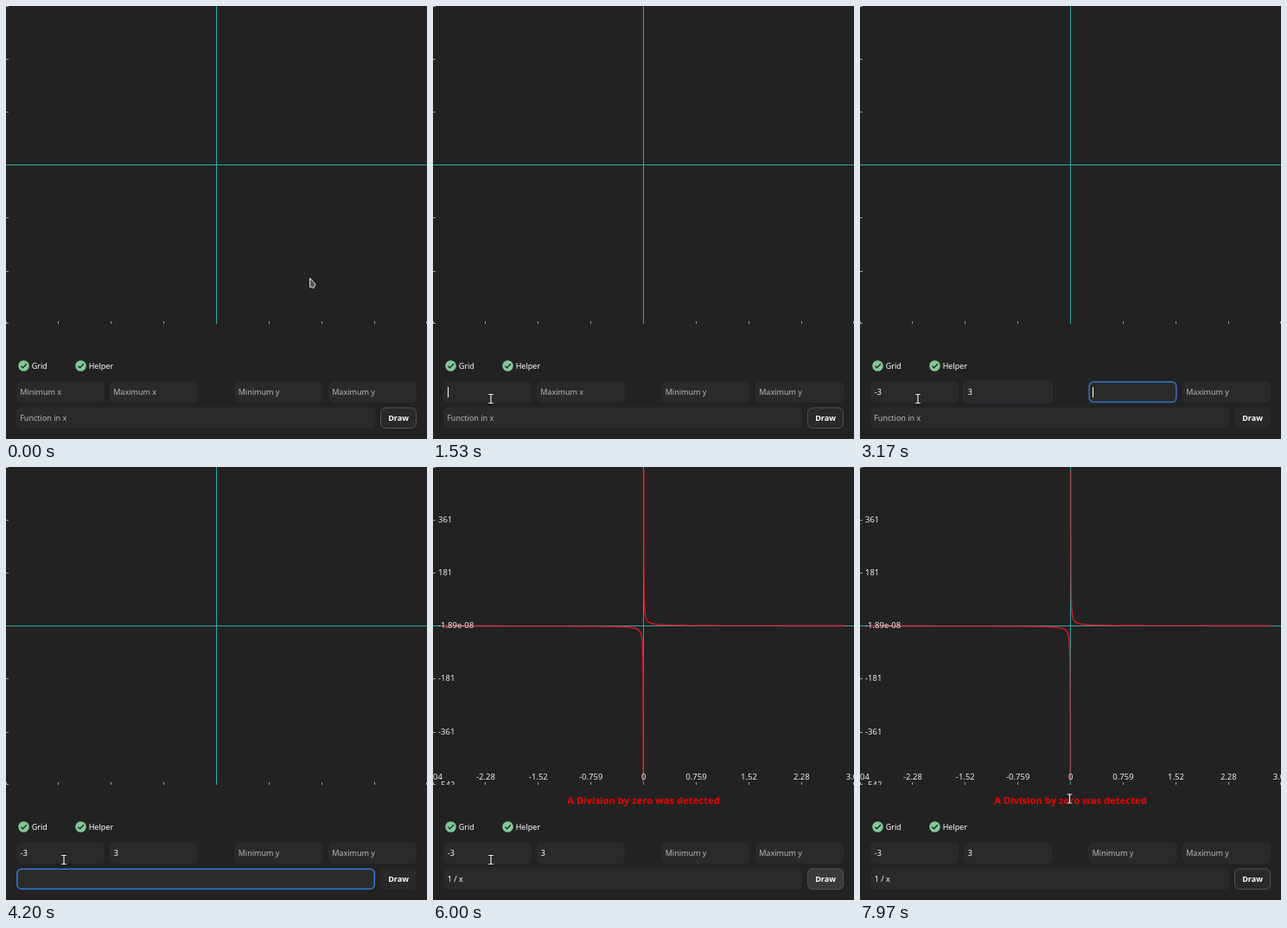
These frames come from a looping animation (487 px wide and 500 px high, 8 s). An HTML page with a canvas:

```html
<!DOCTYPE html>
<html lang="en">
<head>
<meta charset="utf-8">
<title>Function plotter</title>
<style>
  html, body { margin: 0; width: 100%; height: 100%; overflow: hidden; background: #222; }
  canvas { display: block; width: 487px; height: 500px; }
</style>
</head>
<body>
<canvas id="stage" width="487" height="500"></canvas>
<script>
const ctx = document.getElementById('stage').getContext('2d');
const LOOP = 8000, W = 487, H = 500;
const PLOT = { bottom: 367, cx: 243.5, cy: 183.5, stepX: 60.9, stepY: 61.2 };
const FONT = '"Noto Sans", "Open Sans", sans-serif';
const PLOTTED = 5960, PRESS = 5710, RELEASE = 5960;

const fields = [
  { x: 12, y: 433.5, w: 102, hint: 'Minimum x', keys: [[2280, '-'], [2480, '-3']] },
  { x: 120, y: 433.5, w: 102, hint: 'Maximum x', keys: [[2850, '3']] },
  { x: 264.5, y: 433.5, w: 102, hint: 'Minimum y', keys: [] },
  { x: 373, y: 433.5, w: 102, hint: 'Maximum y', keys: [] },
  { x: 12, y: 463.5, w: 415, hint: 'Function in x', keys: [[4430, '1 / x']] }
];
const FIELD_H = 24.5, DRAW = 5;
const focusSteps = [[-1000, DRAW], [1530, 0], [2700, 1], [3000, 2], [3300, 3], [3600, 4], [5500, DRAW]];

// Pointer path: time, x, y
const path = [
  [570, 351.5, 314], [870, 98.5, 412], [1060, 66, 466], [1390, 67, 453.5],
  [6170, 67, 453.5], [6430, 120, 330], [6660, 238, 114], [6960, 112, 245],
  [7060, 96, 305], [7150, 135, 375], [7270, 267, 392], [7340, 345, 400],
  [7450, 470, 230], [7590, 425, 8], [7710, 335, 30], [7830, 306, 114],
  [7900, 268, 270], [7970, 242.5, 383]
];

const clamp = v => Math.max(0, Math.min(1, v));

function last(list, t) {
  let found = null;
  for (const item of list) if (item[0] <= t) found = item;
  return found;
}

function text(str, x, y, size, color, align = 'left', weight = 400) {
  ctx.font = `${weight} ${size}px ${FONT}`;
  ctx.fillStyle = color;
  ctx.textAlign = align;
  ctx.fillText(str, x, y);
}

function box(x, y, w, h, r, fill, stroke, width = 1) {
  ctx.beginPath();
  ctx.roundRect(x, y, w, h, r);
  if (fill) { ctx.fillStyle = fill; ctx.fill(); }
  if (stroke) { ctx.strokeStyle = stroke; ctx.lineWidth = width; ctx.stroke(); }
}

function polyline(points, close) {
  ctx.beginPath();
  points.forEach(([x, y]) => ctx.lineTo(x, y));
  if (close) ctx.closePath();
}

function slope(i, axis) {
  const a = path[i - 1], b = path[i + 1], p = path[i];
  if (!a || !b || p[0] === 1390 || p[0] === 6170) return 0;
  return (b[axis] - a[axis]) / (b[0] - a[0]);
}

function pointerAt(t) {
  if (t <= path[0][0]) return path[0].slice(1);
  const i = path.findIndex(p => p[0] > t) - 1;
  if (i < 0) return path[path.length - 1].slice(1);
  const a = path[i], b = path[i + 1], d = b[0] - a[0], u = (t - a[0]) / d;
  const ease = u * u * (3 - 2 * u);
  return [1, 2].map(k =>
    a[k] + (b[k] - a[k]) * ease
    + d * u * (1 - u) * ((1 - u) * slope(i, k) - u * slope(i + 1, k)));
}

// Share of focus held by a widget while rings cross-fade
function focusLevel(id, t) {
  let level = 0;
  focusSteps.forEach(([start, who], i) => {
    if (who !== id) return;
    const next = focusSteps[i + 1];
    const end = next ? next[0] : Infinity;
    level = Math.max(level, Math.min(clamp((t - start) / 200), 1 - clamp((t - end) / 200)));
  });
  return level;
}

// Visible, fading out, hidden, fading in: a quarter of the cycle each
function blink(ms) {
  const p = (ms % 1200) / 300;
  return p < 1 ? 1 : p < 2 ? 2 - p : p < 3 ? 0 : p - 3;
}

function curve(sign) {
  const pts = [];
  for (let d = 0.151; d < 245; d *= 1.06) {
    pts.push([PLOT.cx + sign * d, PLOT.cy - sign * 27.2 / d]);
  }
  polyline(pts);
  ctx.stroke();
}

function drawAxes() {
  ctx.fillStyle = '#29aaa5';
  ctx.fillRect(0, 183, W, 1);
  ctx.fillRect(243, 0, 1, PLOT.bottom);
}

function drawPlot(plotted) {
  ctx.save();
  ctx.beginPath();
  ctx.rect(0, 0, W, PLOT.bottom);
  ctx.clip();

  ctx.fillStyle = '#a0a0a0';
  for (let i = 0; i <= 6; i++) ctx.fillRect(0, Math.min(366, Math.floor(i * PLOT.stepY)), 3, 1);
  for (let i = 0; i <= 8; i++) ctx.fillRect(Math.min(486, Math.floor(i * PLOT.stepX)), 364, 1, 3);

  drawAxes();
  if (plotted) {
    ctx.strokeStyle = '#d8141e';
    ctx.lineWidth = 1.6;
    ctx.lineJoin = 'round';
    curve(1);
    curve(-1);
    ctx.globalAlpha = 0.4;
    drawAxes();
    ctx.globalAlpha = 1;

    ['361', '181', '-1.89e-08', '-181', '-361', '-542'].forEach((s, i) =>
      text(s, 6, (i + 1) * PLOT.stepY + 2.6, 9.5, '#f0f0f0'));
    ['-3.04', '-2.28', '-1.52', '-0.759', '0', '0.759', '1.52', '2.28', '3.04'].forEach((s, i) =>
      text(s, i * PLOT.stepX, 361.3, 9.5, '#f0f0f0', 'center'));
  }
  ctx.restore();
  if (plotted) text('A Division by zero was detected', 243.5, 389.3, 11.27, '#f00000', 'center', 700);
}

function drawCheck(x, label, hover) {
  const y = 415.5;
  if (hover) {
    ctx.fillStyle = '#2e2e2e';
    ctx.beginPath();
    ctx.arc(x, y, 12, 0, 7);
    ctx.fill();
  }
  ctx.fillStyle = '#81c995';
  ctx.beginPath();
  ctx.arc(x, y, 6.3, 0, 7);
  ctx.fill();
  ctx.strokeStyle = '#222';
  ctx.lineWidth = 1.3;
  polyline([[x - 3.2, y + 0.1], [x - 1, y + 2.3], [x + 3.4, y - 2.2]]);
  ctx.stroke();
  text(label, x + 9.2, 418.9, 9, '#fff');
}

function drawField(f, id, t, focused) {
  box(f.x, f.y, f.w, FIELD_H, 5.5, '#2a2a2a');
  const level = focusLevel(id, t);
  if (level > 0) {
    ctx.globalAlpha = level;
    const grow = (1 - level) * 1.2;
    box(f.x + 0.8 - grow, f.y + 0.8 - grow, f.w - 1.6 + 2 * grow, FIELD_H - 1.6 + 2 * grow, 5, null, '#3078cf', 1.6);
    ctx.globalAlpha = 1;
  }
  const key = last(f.keys, t), base = f.y + 15.8;
  const value = key ? key[1] : '';
  if (value) text(value, f.x + 4.8, base, 9, '#fff');
  else if (!focused) text(f.hint, f.x + 4.2, base, 9, '#b8b8b8');

  if (focused) {
    ctx.font = `9px ${FONT}`;
    const start = Math.max(last(focusSteps, t)[0], key ? key[0] : 0);
    ctx.globalAlpha = blink(t - start);
    ctx.fillStyle = '#fff';
    ctx.fillRect(Math.round(f.x + 4.6 + ctx.measureText(value).width), f.y + 6.5, 1, 12);
    ctx.globalAlpha = 1;
  }
}

function drawButton(t) {
  const level = focusLevel(DRAW, t);
  const lit = t < PRESS ? 0 : Math.min(clamp((t - PRESS) / 100), 1 - clamp((t - RELEASE - 40) / 130));
  const g = Math.round(41 + 17 * lit);
  box(433, 463.5, 42, FIELD_H, 6, `rgb(${g},${g},${g})`);
  if (level > 0) {
    ctx.globalAlpha = level;
    box(433.5, 464, 41, FIELD_H - 1, 5.5, null, '#525252');
    ctx.globalAlpha = 1;
  }
  text('Draw', 454, 479.2, 9, '#fff', 'center', 700);
}

function inside(x, y, l, t, w, h) {
  return x >= l && x <= l + w && y >= t && y <= t + h;
}

function drawPointer(x, y, beam) {
  ctx.save();
  ctx.translate(x, y);
  if (beam) {
    for (const [color, width] of [['#1c1c1c', 2.8], ['#f0f0f0', 1.2]]) {
      ctx.strokeStyle = color;
      ctx.lineWidth = width;
      ctx.beginPath();
      for (const s of [-1, 1]) {
        ctx.moveTo(-2.8, 5 * s);
        ctx.lineTo(2.8, 5 * s);
      }
      ctx.moveTo(0, -5);
      ctx.lineTo(0, 5);
      ctx.stroke();
    }
  } else {
    polyline([[0, 0], [0, 10.7], [2.5, 10.3], [4, 12.2], [6.6, 7.3]], true);
    ctx.fillStyle = '#555';
    ctx.fill();
    ctx.strokeStyle = '#e2e2e2';
    ctx.lineWidth = 1;
    ctx.stroke();
  }
  ctx.restore();
}

function render(t) {
  const plotted = t >= PLOTTED;
  const [px, py] = pointerAt(t);
  const focus = last(focusSteps, t)[1];

  ctx.fillStyle = '#222';
  ctx.fillRect(0, 0, W, H);
  drawPlot(plotted);
  drawCheck(20.5, 'Grid', inside(px, py, 9, 404, 41, 23));
  drawCheck(86.5, 'Helper', inside(px, py, 75, 404, 52, 23));
  fields.forEach((f, i) => drawField(f, i, t, focus === i));
  drawButton(t);

  const typing = t >= 2280 && t < 2700;
  const onText = fields.some(f => inside(px, py, f.x, f.y, f.w, FIELD_H))
    || (plotted && inside(px, py, 154, 377, 179, 17));
  if (!typing) drawPointer(px, py, onText);
}

const begin = performance.now();
function frame() {
  render((performance.now() - begin) % LOOP);
  requestAnimationFrame(frame);
}
frame();
</script>
</body>
</html>
```
